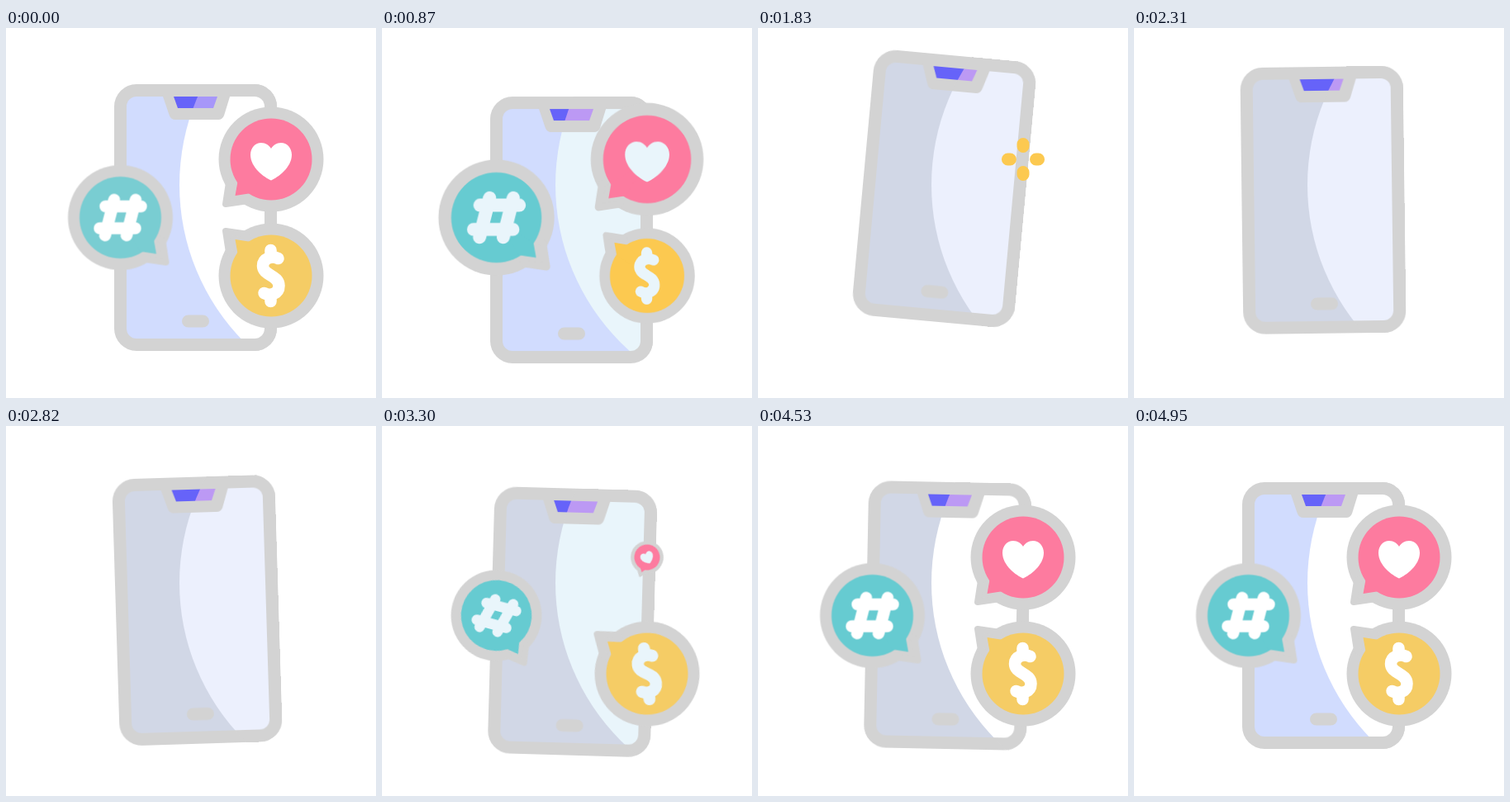
These frames come from a looping animation (448 by 448 pixels, 5.1 s). An HTML page:

```html
<!DOCTYPE html>
<html lang="en">
<head>
<meta charset="utf-8">
<title>Social phone</title>
<style>
html, body { margin: 0; width: 100%; height: 100%; overflow: hidden; background: #fff; }
svg { display: block; width: 100%; height: 100%; animation: palette 5.1s step-end infinite; }

.grey { fill: #d3d3d3; }
.rim { fill: #d3d3d3; stroke: #d3d3d3; stroke-width: 8; stroke-linejoin: round; }
.glyph { fill: var(--glow); }
.line { fill: none; stroke: var(--glow); stroke-width: 14.5; stroke-linecap: round; stroke-linejoin: round; }
.base { --screen: var(--shade); --cam: #6663f9; }
.lit { --screen: var(--glow); --cam: var(--violet); }

.lift { animation: lift 5.1s linear infinite; }
.sway { transform-origin: 229.5px 229.5px; animation: sway 5.1s ease-in-out infinite; }
.bubble { transform-origin: 0 0; animation: 5.1s linear infinite; }
.tilt { transform-origin: 0 0; animation: tilt 5.1s ease-in-out infinite; }
.burst {
  fill: none; stroke: #fcc950; stroke-linecap: round; stroke-dasharray: 3 60;
  animation: burst 5.1s linear infinite;
}

.coin { --tone: var(--gold); --dir: -1; }
.tag { --tone: var(--teal); --dir: -1; }
.like { --tone: #fd7b9f; --dir: 1; }
.coin .bubble { animation-name: coin; }
.tag .bubble { animation-name: tag; }
.like .bubble { animation-name: like; }
.tag .tilt { animation-delay: .22s; }
.like .tilt { animation-delay: .36s; }
.coin .burst { animation-delay: -.7s; }
.tag .burst { animation-delay: -.35s; }

@keyframes palette {
  0% { --shade: #d1dcfe; --glow: #fff; --violet: #a797f9; --teal: #79cdd2; --gold: #f5cc65; }
  3.53% { --shade: #d1dcfe; --glow: #fff; --violet: #bc99f4; --teal: #66cbd1; --gold: #f5cc65; }
  10.5% { --shade: #d1dcfe; --glow: #e9f5fb; --violet: #bc99f4; --teal: #66cbd1; --gold: #fcc950; }
  26.5% { --shade: #d1d7e6; --glow: #ecf0fd; --violet: #bc99f4; --teal: #66cbd1; --gold: #fcc950; }
  59% { --shade: #d1d7e6; --glow: #e9f5fb; --violet: #bc99f4; --teal: #66cbd1; --gold: #f5cc65; }
  88.23% { --shade: #d1d7e6; --glow: #fff; --violet: #bc99f4; --teal: #66cbd1; --gold: #f5cc65; }
  93% { --shade: #d1dcfe; --glow: #fff; --violet: #bc99f4; --teal: #66cbd1; --gold: #f5cc65; }
  100% { --shade: #d1dcfe; --glow: #fff; --violet: #bc99f4; --teal: #66cbd1; --gold: #f5cc65; }
}
@keyframes lift {
  0% { transform: translateY(0); }
  3.53% { transform: translateY(0); animation-timing-function: ease-in; }
  13.53% { transform: translateY(8px); }
  17.06% { transform: translateY(15px); animation-timing-function: ease-out; }
  19.41% { transform: translateY(19px); animation-timing-function: cubic-bezier(.4, 0, .75, .75); }
  24.12% { transform: translateY(-43px); animation-timing-function: ease-out; }
  27.84% { transform: translateY(-57px); animation-timing-function: ease-in-out; }
  35.29% { transform: translateY(-36px); }
  72.35% { transform: translateY(19px); animation-timing-function: ease-in-out; }
  84.12%, 100% { transform: translateY(0); }
}
@keyframes sway {
  0%, 19.61% { transform: translateX(0) rotate(0deg); }
  28.24% { transform: translateX(0) rotate(-2deg); }
  39.22% { transform: translateX(-5px) rotate(7deg); }
  50.2% { transform: translateX(2.5px) rotate(-6deg); }
  60.78% { transform: translateX(1.5px) rotate(3deg); }
  71.57% { transform: translateX(0) rotate(-2deg); }
  82.94% { transform: translateX(0) rotate(1.8deg); }
  97.06%, 100% { transform: translateX(0) rotate(0deg); }
}
@keyframes coin {
  0%, 3.53% { transform: scale(1); }
  14.12% { transform: scale(1.135); animation-timing-function: cubic-bezier(.11, 0, .5, 0); }
  20.78% { transform: scale(0); }
  56.86% { transform: scale(0); animation-timing-function: ease-out; }
  62.35%, 100% { transform: scale(1); }
}
@keyframes tag {
  0%, 3.53% { transform: scale(1); }
  20.98% { transform: scale(1.135); animation-timing-function: cubic-bezier(.11, 0, .5, 0); }
  27.65% { transform: scale(0); }
  60.78% { transform: scale(0); animation-timing-function: ease-out; }
  66.47%, 100% { transform: scale(1); }
}
@keyframes like {
  0%, 3.53% { transform: scale(1); }
  27.84% { transform: scale(1.135); animation-timing-function: cubic-bezier(.11, 0, .5, 0); }
  34.51% { transform: scale(0); }
  63.53% { transform: scale(0); animation-timing-function: ease-out; }
  69.41%, 100% { transform: scale(1); }
}
@keyframes tilt {
  0%, 56.8% { transform: rotate(0deg); }
  56.86% { transform: rotate(calc(var(--dir) * -25deg)); }
  66.27% { transform: rotate(calc(var(--dir) * 8deg)); }
  73.33%, 100% { transform: rotate(0deg); }
}
@keyframes burst {
  0%, 34.5% { opacity: 0; stroke-dashoffset: 0; stroke-width: 15px; }
  34.51% { opacity: 1; stroke-dashoffset: 0; stroke-width: 15px; }
  35.88% { opacity: 1; stroke-dashoffset: -15.5px; stroke-width: 15px; }
  37.65% { opacity: 1; stroke-dashoffset: -21px; stroke-width: 15px; }
  40.2% { opacity: 1; stroke-dashoffset: -21px; stroke-width: 0; }
  40.21%, 100% { opacity: 0; stroke-dashoffset: -21px; stroke-width: 0; }
}
</style>
</head>
<body>
<svg viewBox="0 0 448 448">
  <defs>
    <clipPath id="lens"><circle cx="480" cy="190" r="270"/></clipPath>
    <g id="phone">
      <rect class="grey" x="131" y="68" width="197" height="323" rx="27"/>
      <rect x="146" y="83" width="167" height="293" rx="12" style="fill:var(--screen)"/>
      <path class="grey" d="M189 80L197.5 105Q199.500 111 205 111H257Q262 111 264 106L272 80Z"/>
      <path d="M203 83H256L251 97H208Z" style="fill:var(--cam)"/>
      <rect class="grey" x="213" y="347.500" width="33" height="15" rx="7.500"/>
    </g>
    <g id="balloon">
      <circle class="grey" r="63.500"/>
      <path class="rim" d="M-51 28L-55 54L-31 50.500L0 0Z"/>
      <g style="fill:var(--tone)">
        <circle r="49.500"/>
        <path d="M-40.500 27L-43.500 44L-24 41L0 0Z"/>
      </g>
    </g>
    <path id="rays" d="M0 0V-24M0 0V24M0 0H-24M0 0H24"/>
  </defs>

  <g class="base"><g class="lift"><g class="sway"><use href="#phone"/></g></g></g>
  <g class="lit" clip-path="url(#lens)"><g class="lift"><g class="sway"><use href="#phone"/></g></g></g>

  <g class="coin" transform="translate(321 300)">
    <g class="bubble"><g class="tilt">
      <use href="#balloon" transform="scale(1 -1)"/>
      <path class="line" d="M8.500 -21C1 -25 -10 -21 -10 -12C-10 0 9.500 -1 9.500 12C9.500 22 -1 25 -8.500 21M-.5 -31V-23M-.5 23V31"/>
    </g></g>
    <use class="burst" href="#rays"/>
  </g>

  <g class="tag" transform="translate(138.500 229.500)">
    <g class="bubble"><g class="tilt">
      <use href="#balloon" transform="scale(-1 1)"/>
      <path class="line" d="M-18 -13.500H25M-25 13H18M-7.500 -21.500L-18.500 21.500M18.500 -21.500L7.500 21.500"/>
    </g></g>
    <use class="burst" href="#rays"/>
  </g>

  <g class="like" transform="translate(321 159)">
    <g class="bubble"><g class="tilt">
      <use href="#balloon"/>
      <path class="glyph" d="M0 25.500C-8 22 -25 10 -25 -5.500C-25 -14 -19 -20 -12 -20C-6.500 -20 -2.500 -17 0 -13C2.500 -17 6.500 -20 12 -20C19 -20 25 -14 25 -5.500C25 10 8 22 0 25.500Z"/>
    </g></g>
    <use class="burst" href="#rays"/>
  </g>
</svg>
</body>
</html>
```
